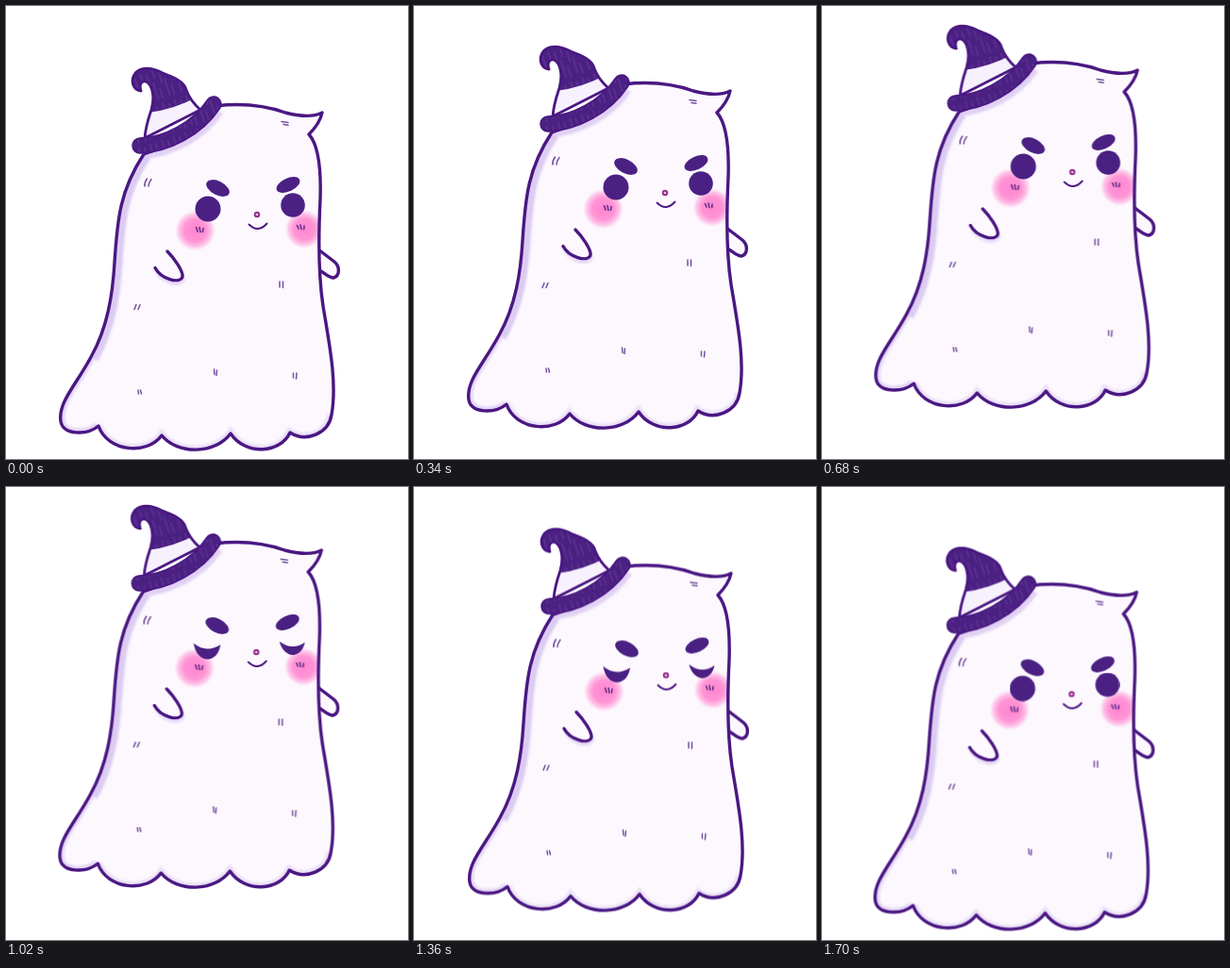
An HTML page for the animation above (1.87 s loop, 426 by 480 pixels).

```html
<!DOCTYPE html>
<html lang="en">
<head>
<meta charset="utf-8">
<title>Floating ghost</title>
<style>
  html, body { margin: 0; width: 100%; height: 100%; overflow: hidden; background: #fff; }
  svg { display: block; width: 100vw; height: 100vh; }
  .ink { fill: none; stroke: #4a1782; stroke-width: 3.4; stroke-linecap: round; stroke-linejoin: round; }
  .thin { stroke-width: 1.9; }
  .tick { stroke: #75509f; stroke-width: 1.5; }
  .dark { fill: #4b2083; }
  .shade { fill: none; stroke: #dccbf2; }

  #ghost, .eyes { animation: 1870ms step-end infinite; }
  #ghost { animation-name: float; }
  .open { animation-name: open !important; }
  .half { animation-name: half !important; }
  .shut { animation-name: shut !important; }

  @keyframes float {
    0% { transform: translate(0, 0); }
    9.09% { transform: translate(0, -10.7px); }
    18.18% { transform: translate(0, -23px); }
    27.27% { transform: translate(-.4px, -35px); }
    36.36% { transform: translate(-.7px, -45px); }
    45.45% { transform: translate(-.7px, -54px); }
    54.54% { transform: translate(-.7px, -46px); }
    63.63% { transform: translate(.3px, -32.7px); }
    72.72% { transform: translate(1px, -21.5px); }
    81.81% { transform: translate(.7px, -11.5px); }
    90.9%, 100% { transform: translate(-1.5px, -1.5px); }
  }
  @keyframes open { 0%, 72.72% { opacity: 1; } 54.54% { opacity: 0; } 81.81%, 100% { opacity: 1; } 72.72% { opacity: 0; } }
  @keyframes half { 0%, 63.63%, 81.81%, 100% { opacity: 0; } 54.54%, 72.72% { opacity: 1; } }
  @keyframes shut { 0%, 72.72%, 100% { opacity: 0; } 63.63% { opacity: 1; } }
</style>
</head>
<body>
<svg viewBox="0 0 426 480" preserveAspectRatio="none">
  <defs>
    <path id="body" d="M222 106 Q262 101 296 113 C315 118 327 117 335 113 C333 123 327 130 321 136
      C331 147 334 175 333 205 C331 245 331 285 336 318 C343 360 351 400 345 433
      C342 453 318 463 301 452 C291 474 254 477 238 453 C222 475 182 476 165 455
      C150 476 108 473 98 445 C86 455 60 455 58 440 C55 420 74 402 90 372
      C108 340 113 305 115 272 C118 225 121 195 146 157 Q190 143 222 106 Z"/>
    <path id="cone" d="M147 140 C148 127 151 119 154 110 C158 96 155 83 148 80 C143 79 141 84 143 90
      C134 89 131 78 138 70 C147 63 158 67 166 71 C177 75 189 80 191 89 C194 97 198 103 206 110 Z"/>
    <path id="brim" d="M142 148 C170 147 203 130 220 104"/>
    <clipPath id="inBody"><use href="#body"/></clipPath>
    <clipPath id="inCone"><use href="#cone"/></clipPath>
    <radialGradient id="pink">
      <stop offset="0" stop-color="#ff85cf"/>
      <stop offset=".55" stop-color="#ff8fd3" stop-opacity=".95"/>
      <stop offset=".8" stop-color="#ffa6dc" stop-opacity=".65"/>
      <stop offset="1" stop-color="#ffc4e8" stop-opacity="0"/>
    </radialGradient>
    <pattern id="streaks" width="13" height="37" patternUnits="userSpaceOnUse" patternTransform="rotate(-18)">
      <path d="M2 3v15M6 14v19M9 1v10M11 22v12" stroke="#8c6bb8" stroke-width=".7" opacity=".55"/>
    </pattern>
    <filter id="soft"><feGaussianBlur stdDeviation="1.2"/></filter>
  </defs>

  <g id="ghost">
    <path class="ink" style="fill:#fcf8fe" d="M331 258 L348 271 C354 276 354 286 347 288 C342 288 338 283 332 280"/>
    <use href="#body" fill="#fcf8fe"/>

    <g clip-path="url(#inBody)">
      <g class="shade" filter="url(#soft)">
        <path stroke-width="17" d="M146 157 C121 195 118 225 115 272 C113 305 108 340 90 372"/>
        <path stroke-width="9" opacity=".8" d="M90 372 C74 402 55 420 58 440 C60 455 86 455 98 445"/>
        <path stroke-width="9" opacity=".6" d="M98 445 C108 473 150 476 165 455 C182 476 222 475 238 453 C254 477 291 474 301 452 C318 463 342 453 345 433"/>
        <path stroke-width="16" d="M145 154 C174 152 207 135 223 110" opacity=".85"/>
        <path stroke-width="4" d="M160 282 C169 294 184 298 189 288" opacity=".7"/>
      </g>
      <circle cx="200.5" cy="238" r="21.5" fill="url(#pink)"/>
      <circle cx="316" cy="236.5" r="20.5" fill="url(#pink)"/>
    </g>
    <use href="#body" class="ink"/>

    <path class="ink tick" d="M149.500 183q-3 4-2.500 8M154 183.500q-3 4-3 7.500M292 122.500l7 1M294 125.500l5 .7
      M138 316.500l-2 5M142 316.500l-2 5M290 292v6M293.500 292v6.500M220.500 385l.5 5.500M223.500 386l-.5 5.500
      M304.500 389v5M308 389l-.5 6M140 407l.5 4M142.500 407l1 4"/>
    <path class="ink" d="M171 260 C178 267 188 281 187 287 C184 295 164 289 158 277.500"/>

    <g class="dark">
      <ellipse cx="224.500" cy="193" rx="13.300" ry="7.300" transform="rotate(27 224.500 193)"/>
      <ellipse cx="299" cy="189.500" rx="13.300" ry="7" transform="rotate(-25 299 189.500)"/>
    </g>
    <circle class="ink thin" cx="266" cy="221" r="2.300" style="stroke:#93318f;fill:#f6b7e2"/>
    <path class="ink thin" d="M257.500 231.500 Q267 241 276.500 230.500"/>
    <path class="ink thin" style="stroke:#65308f;stroke-width:1.600" d="M201.500 234.500l1.500 4.500M205 234.500l1 5M209 235.500l-.5 4M308.500 232.500l1.500 3.500M312 232l1 4.500M316 233l-.3 3.500"/>

    <g class="eyes open dark">
      <circle cx="214" cy="215" r="13.500"/>
      <circle cx="304" cy="211" r="12.800"/>
    </g>
    <g class="eyes half dark">
      <path d="M199.500 211.500 Q213 222.500 228 213 C225 234 203 234 199.500 211.500 Z"/>
      <path d="M290.500 209.500 Q304 220 317.500 210.500 C314 228.500 295 228.500 290.500 209.500 Z"/>
    </g>
    <g class="eyes shut dark">
      <path d="M200.500 216 C204 226 217 228 226 222.500 C217 231.500 202 230 200.500 216 Z"/>
      <path d="M292 215 C296 223 306 224 315.500 219.500 C307 227 294 226 292 215 Z"/>
    </g>

    <use href="#cone" fill="#f7f0fd"/>
    <g clip-path="url(#inCone)">
      <path class="shade" stroke-width="5" opacity=".55" d="M149 139 Q183 130 207 108"/>
      <path class="dark" d="M125 60 H205 V95 Q178 110 150 113 L125 100 Z"/>
      <path fill="url(#streaks)" d="M125 60 H205 V95 Q178 110 150 113 L125 100 Z"/>
    </g>
    <use href="#cone" class="ink" style="stroke-width:2.800"/>
    <g fill="none" stroke-linecap="round">
      <use href="#brim" stroke="#4a1782" stroke-width="17.500"/>
      <use href="#brim" stroke="#4b2083" stroke-width="14"/>
      <use href="#brim" stroke="url(#streaks)" stroke-width="14"/>
    </g>
  </g>
</svg>
</body>
</html>
```
